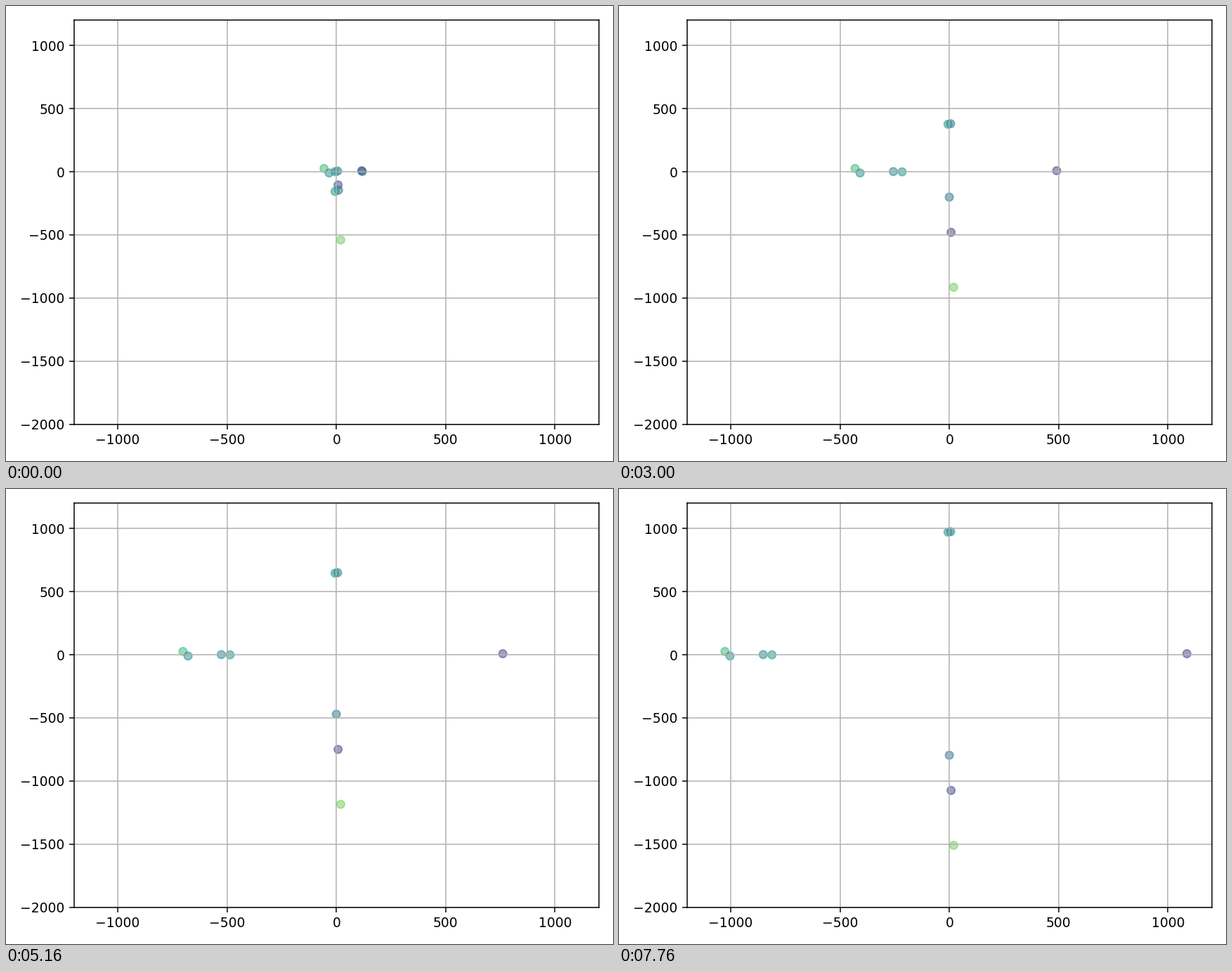
Animation of 864 by 648 pixels, one loop 7.8 s. Source, as a matplotlib script:

```python
import numpy as np
import matplotlib.pyplot as plt
from matplotlib.animation import FuncAnimation

FRAMES = 195
INTERVAL = 40
SPEED = 5

STEP = {"U": (0, 1), "D": (0, -1), "L": (-1, 0), "R": (1, 0)}

# start x, start y, colour value, route; the last heading of a route goes on
WALKERS = [
    (20, -540, 0.78, "D"),
    (8, -105, 0.20, "D"),
    (-56, 26, 0.67, "L"),
    (-33, -10, 0.50, "L"),
    (-6, 1, 0.54, "U"),
    (6, 5, 0.43, "U"),
    (119, 1, 0.47, "L"),
    (116, 8, 0.20, "R"),
    (10, -146, 0.38, "U" * 31 + "LL" + "D"),
    (-6, -156, 0.53, "U" * 31 + "R" + "L"),
]


def track(x, y, route):
    """Positions of one walker over the whole loop."""
    headings = route + route[-1] * FRAMES
    moves = np.array([STEP[h] for h in headings[:FRAMES - 1]])
    walked = np.vstack([(0, 0), np.cumsum(moves, axis=0)])
    return np.array((x, y)) + SPEED * walked


tracks = np.stack([track(x, y, route) for x, y, _, route in WALKERS], axis=1)
values = [w[2] for w in WALKERS]

fig, ax = plt.subplots(figsize=(6.4, 4.8), dpi=135)
dots = ax.scatter(*tracks[0].T, c=values, cmap="viridis", vmin=0, vmax=1,
                  alpha=0.5)
ax.set_xlim(-1200, 1200)
ax.set_ylim(-2000, 1200)
ax.grid(True)
fig.tight_layout()


def update(frame):
    dots.set_offsets(tracks[frame])
    return (dots,)


anim = FuncAnimation(fig, update, frames=FRAMES, interval=INTERVAL,
                     repeat=True, repeat_delay=0)
plt.show()
```
